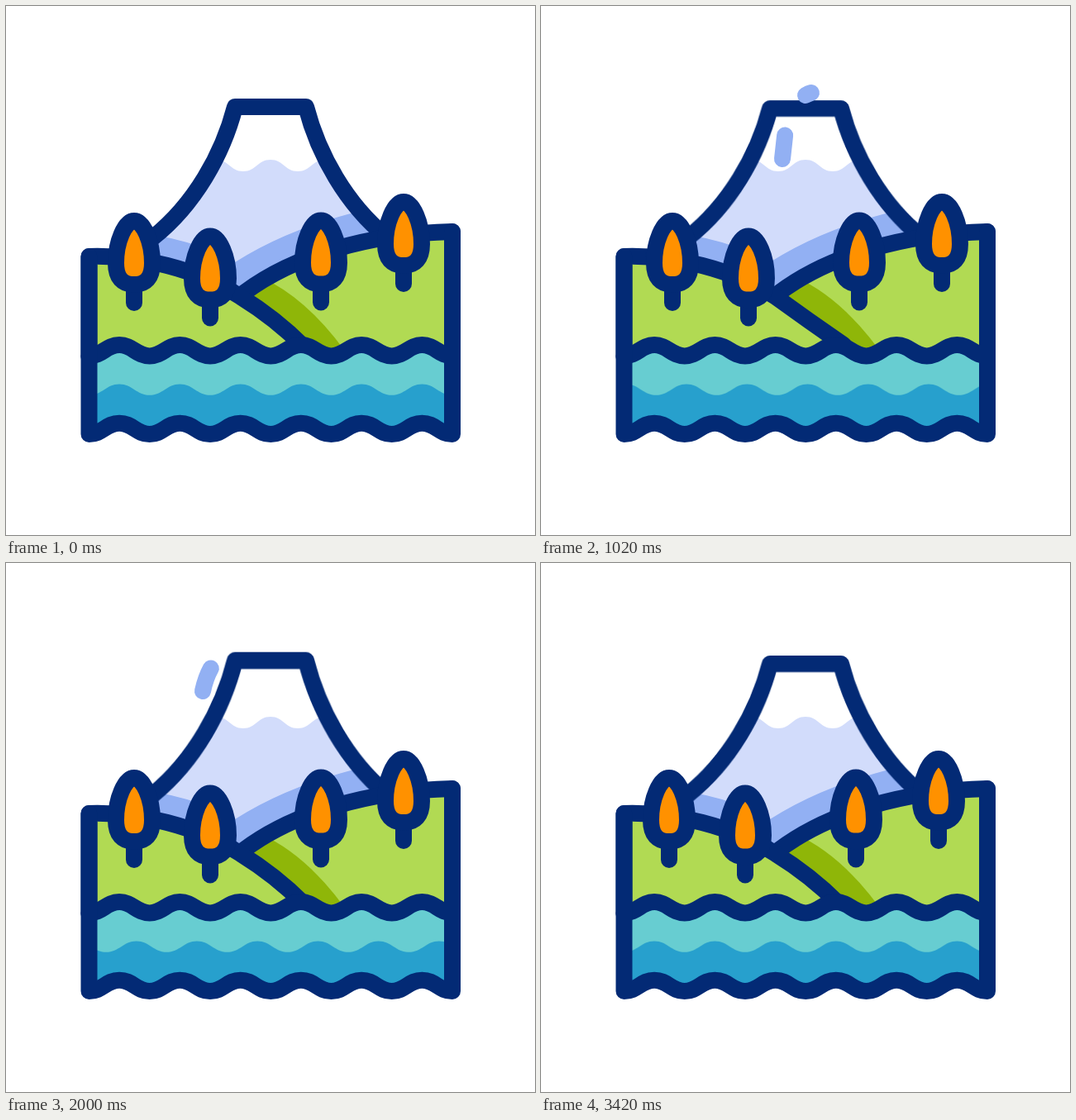
An HTML page for the animation above (3580 ms loop, 640 by 640 pixels).

```html
<!DOCTYPE html>
<html lang="en">
<head>
<meta charset="utf-8">
<title>Volcano lake</title>
<style>
  html, body { margin: 0; height: 100%; overflow: hidden; background: #fff; }
  svg { display: block; width: 100vw; height: 100vh; }
  .line { fill: none; stroke: #032a75; stroke-width: 20; stroke-linecap: round; stroke-linejoin: round; }
  .grass { fill: #b1da53; }

  #cone, #trees, #left, #tide { animation: 3580ms infinite; }
  #cone, #trees { animation-timing-function: cubic-bezier(.37, 0, .63, 1); }
  #cone { animation-name: heave; transform-origin: 0 283px; }
  #trees { animation-name: shake; }
  #left { animation-name: bend; }
  #tide { animation-name: flow; }

  .smoke {
    fill: none; stroke: #92b0f3; stroke-width: 20; stroke-linecap: round; opacity: 0;
    animation: puff 3580ms cubic-bezier(.33, 0, .67, 1) infinite;
  }

  @keyframes shake {
    0%, 50.62%, 100% { transform: none; }
    2.11%, 10.55%, 18.98%, 27.42%, 35.86%, 44.29% { transform: translateX(5.6px); }
    6.33%, 14.76%, 23.2%, 31.64%, 40.07%, 48.51% { transform: translateX(-5px); }
  }
  @keyframes heave {
    0%, 50.62%, 62%, 100% { transform: scaleY(1); }
    2.11%, 10.55%, 18.98%, 27.42%, 35.86%, 44.29% { transform: scaleY(.981); }
    6.33%, 14.76%, 23.2%, 31.64%, 40.07%, 48.51% { transform: scaleY(1.022); }
    55.87% { transform: scaleY(1.025); }
  }
  @keyframes bend {
    0%, 53%, 100% { d: path("M100.5 303C160 301 232 318 284 352Q326 378 360 412L360 425L100.5 425Z"); }
    6%, 46% { d: path("M100.5 303C160 301 232 318 284 352Q324 381 366 410L366 425L100.5 425Z"); }
  }
  @keyframes flow {
    0% { transform: none; animation-timing-function: cubic-bezier(.45, 0, .66, 1); }
    95.53%, 100% { transform: translateX(-219.75px); }
  }
  /* dash length is the head, dash offset the tail */
  @keyframes puff {
    0% { stroke-dasharray: .001px 3px; stroke-dashoffset: 0px; opacity: 1; }
    6.7% { stroke-dashoffset: 0px; }
    11.17% { stroke-dasharray: .85px 3px; }
    20.67% { stroke-dashoffset: -.999px; }
    23.46% { opacity: 1; }
    23.47%, 100% { stroke-dasharray: .85px 3px; stroke-dashoffset: -.999px; opacity: 0; }
  }
</style>
</head>
<body>
<svg viewBox="0 0 640 640">
  <defs>
    <path id="slopes" d="M178 280C228 240 262 180 277 122L363 122C378 180 412 240 460 279"/>
    <clipPath id="inCone"><path d="M178 280C228 240 262 180 277 122L363 122C378 180 412 240 460 279L290 360L180 320Z"/></clipPath>
    <clipPath id="inLake"><path id="basin"/></clipPath>
    <g id="tree">
      <path class="line" d="M0 77V99"/>
      <path class="line" style="fill:#ff9100" d="M0 0C11 0 22 25 22 51C22 69 14 77 0 77C-14 77 -22 69 -22 51C-22 25 -11 0 0 0Z"/>
    </g>
  </defs>

  <g clip-path="url(#inCone)">
    <path fill="#d2dcfb" d="M150 186H254C270 186 271 200 287 200S304 186 320 186S337 200 353 200S370 186 386 186H480V380H150Z"/>
    <path fill="#92b0f3" d="M150 274Q220 279 277 310Q340 270 425 249L480 240V380H150Z"/>
  </g>
  <use id="cone" href="#slopes" class="line"/>

  <path class="grass" d="M288 347C348 302 440 275 540 273V425H288Z"/>
  <path fill="#8fb608" d="M284 345L308 328Q362 352 409 416H340Z"/>
  <path class="line" d="M288 347C348 302 440 275 540 273"/>
  <path id="left" class="line" style="fill:#b1da53"/>

  <g clip-path="url(#inLake)">
    <rect x="100" y="400" width="440" height="130" fill="#67cdd1"/>
    <path id="tide" fill="#27a0cd"/>
  </g>
  <path id="shore" class="line"/>
  <path id="frame" class="line"/>

  <g id="trees">
    <use href="#tree" x="155" y="260"/>
    <use href="#tree" x="247" y="278.5"/>
    <use href="#tree" x="381" y="259.5"/>
    <use href="#tree" x="481" y="237"/>
  </g>

  <path class="smoke" pathLength="1" style="animation-delay:40ms" d="M335 119C358 97 382 103 395 149"/>
  <path class="smoke" pathLength="1" style="animation-delay:460ms" d="M322 110C302 96 300 110 292 185"/>
  <path class="smoke" pathLength="1" style="animation-delay:945ms" d="M320 108C340 96 346 115 350 180"/>
  <path class="smoke" pathLength="1" style="animation-delay:1440ms" d="M305 118C285 95 250 100 238 155"/>
</svg>
<script>
  const half = 36.625, rise = 13.3;
  // dir 1 runs right, -1 runs left
  const ripple = (n, dir = 1) => {
    const a = 16 * dir, w = half * dir;
    return `c${a} 0 ${w - a} ${-rise} ${w} ${-rise}s${w - a} ${rise} ${w} ${rise}`.repeat(n);
  };
  const draw = (id, d) => document.getElementById(id).setAttribute('d', d);

  draw('shore', `M100.5 423.4${ripple(6)}`);
  draw('frame', `M100.5 303V518${ripple(6)}V273`);
  draw('basin', `M100.5 423.4${ripple(6)}V518${ripple(6, -1)}Z`);
  draw('tide', `M100.5 470.7${ripple(9)}V530H100.5Z`);
</script>
</body>
</html>
```
